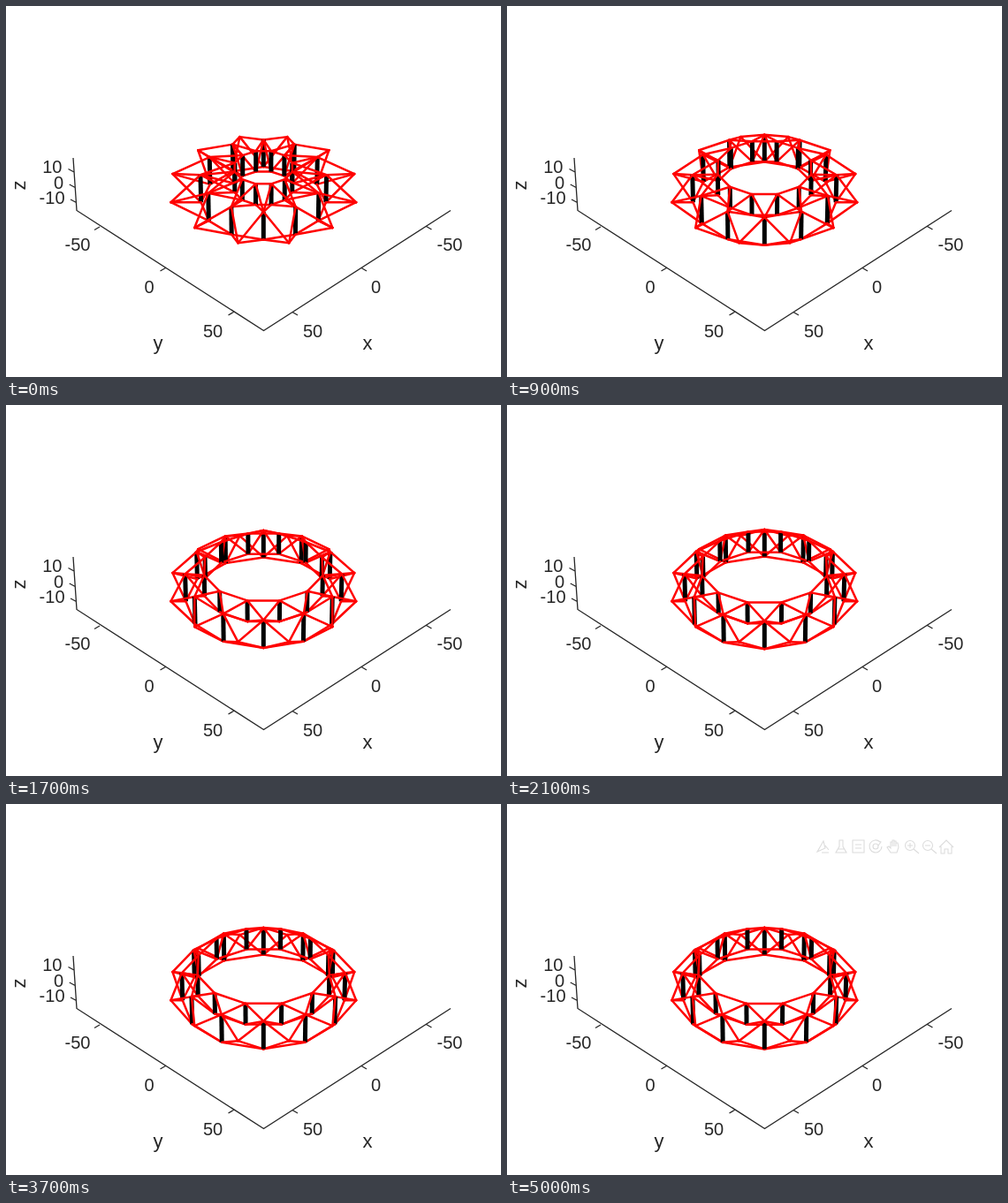
Write an HTML page with a canvas that moves like this. It is 560 px wide and 420 px high and loops after 5100 ms.

```html
<!DOCTYPE html>
<html lang="en">
<head>
<meta charset="utf-8">
<title>Deploying cable ring</title>
<style>
  html, body { margin: 0; width: 100%; height: 100%; overflow: hidden; background: #fff; }
  svg, canvas { position: absolute; left: 0; top: 0; width: 560px; height: 420px; }
  text { font: 20px "Liberation Sans", Arial, sans-serif; fill: #262626; text-anchor: middle; }
  .z { text-anchor: end; }
  .name { font-size: 22px; }
  .axes { fill: none; stroke: #262626; stroke-width: 1.3; }
  #tools { fill: none; stroke: #dcdcdc; stroke-width: 1.1; opacity: 0; }
</style>
</head>
<body>
<svg viewBox="0 0 560 420">
  <path class="axes" d="M503 231.500L291.500 367.500L80 231.500L76 172
    M106 250l-6 3.500M180.500 296.500l-6 3.500M257.500 346.500l-6 3.500
    M475.500 249.500l6 3.500M402 296.500l6 3.500M324 346.500l6 3.500
    M77 188l-6.500-3.500M78.200 205.500l-6.500-3.500M79.500 222.500l-6.500-3.500"/>
  <text x="81" y="277">-50</text>
  <text x="162" y="325">0</text>
  <text x="234" y="375">50</text>
  <text x="502" y="277">-50</text>
  <text x="418.500" y="325">0</text>
  <text x="347" y="375">50</text>
  <text class="z" x="63.500" y="189">10</text>
  <text class="z" x="65" y="207">0</text>
  <text class="z" x="66.500" y="224">-10</text>
  <text class="name" x="409" y="389">x</text>
  <text class="name" x="172" y="389">y</text>
  <text class="name" transform="translate(22 203) rotate(-90)">z</text>
  <g id="tools">
    <path d="M351 54l7-12l2 8zM356 55h8M360 47l4 5"/>
    <path d="M376 41h4v7l4 7h-12l4-7zM374 51h8"/>
    <path d="M391 41h13v14h-13zM394 46h7M394 50h7"/>
    <path d="M422 43a7 7 0 1 0 2 5M418 41l5 2l-3 4"/>
    <circle cx="417" cy="48" r="3"/>
    <path d="M434 55l-4-6l2-1l2 2v-7h2v5v-7h2v7v-6h2v6v-4h2l1 5l-2 6z"/>
    <path d="M460 51l6 5M453 47h6M456 44v6"/>
    <circle cx="456" cy="47" r="5.500"/>
    <path d="M480 51l6 5M473 47h6"/>
    <circle cx="476" cy="47" r="5.500"/>
    <path d="M489 49l8-8l8 8M491 48v8h4v-5h4v5h4v-8"/>
  </g>
</svg>
<canvas id="stage" width="560" height="420"></canvas>
<script>
const ctx = document.getElementById('stage').getContext('2d');
const tools = document.getElementById('tools');
const LOOP = 5100, STEP = 100, COUNT = 12;
const SIN = Math.sqrt(1 / 3), COS = Math.sqrt(2 / 3), CAMERA = 2372;

// Isometric view direction with a slight perspective.
function project(radius, degrees, z) {
  const a = degrees * Math.PI / 180;
  const toward = radius * Math.cos(a);
  const depth = toward * COS + z * SIN;
  const k = 1 / (1 - depth / CAMERA);
  return {
    x: 291.3 + radius * Math.sin(a) * k,
    y: 206 + (toward * SIN - z * COS) * k,
    depth
  };
}

const ring = (radius, offset, z) =>
  Array.from({ length: COUNT }, (_, i) => project(radius, offset + 30 * i, z));

function buildRing(outer, inner) {
  const rim = ring(107.5, 15, 0);
  const outTop = ring(outer, 0, 18), outLow = ring(outer, 0, -20);
  const inTop = ring(inner, 15, 28.5), inLow = ring(inner, 15, 0);
  const parts = [];
  const add = (a, b, bar = false) => parts.push({ a, b, bar, depth: a.depth + b.depth });

  for (let i = 0; i < COUNT; i++) {
    const next = (i + 1) % COUNT;
    add(outTop[i], outLow[i], true);
    add(inTop[i], inLow[i], true);
    for (const hoop of [outLow, inTop, inLow]) add(hoop[i], hoop[next]);
    for (const j of [i, next]) {
      add(rim[i], outTop[j]);
      add(rim[i], outLow[j]);
      add(outTop[j], inTop[i]);
      add(outTop[j], inLow[i]);
    }
  }
  return parts.sort((p, q) => p.depth - q.depth);
}

function draw(ms) {
  const rest = Math.exp(-0.77 * Math.pow(ms / 1000, 1.5));
  ctx.clearRect(0, 0, 560, 420);
  for (const { a, b, bar } of buildRing(92.1 - 21.1 * rest, 76.3 - 42.8 * rest)) {
    ctx.strokeStyle = bar ? '#000' : '#f00';
    ctx.lineWidth = bar ? 5 : 2.5;
    ctx.lineCap = bar ? 'butt' : 'round';
    ctx.beginPath();
    ctx.moveTo(a.x, a.y);
    ctx.lineTo(b.x, b.y);
    ctx.stroke();
  }
  tools.style.opacity = Math.max(0, (ms - 4700) / 300);
}

const start = performance.now();
let shown = -1;
function tick() {
  const ms = Math.floor((performance.now() - start) % LOOP / STEP) * STEP;
  if (ms !== shown) draw(shown = ms);
  requestAnimationFrame(tick);
}
tick();
</script>
</body>
</html>
```
